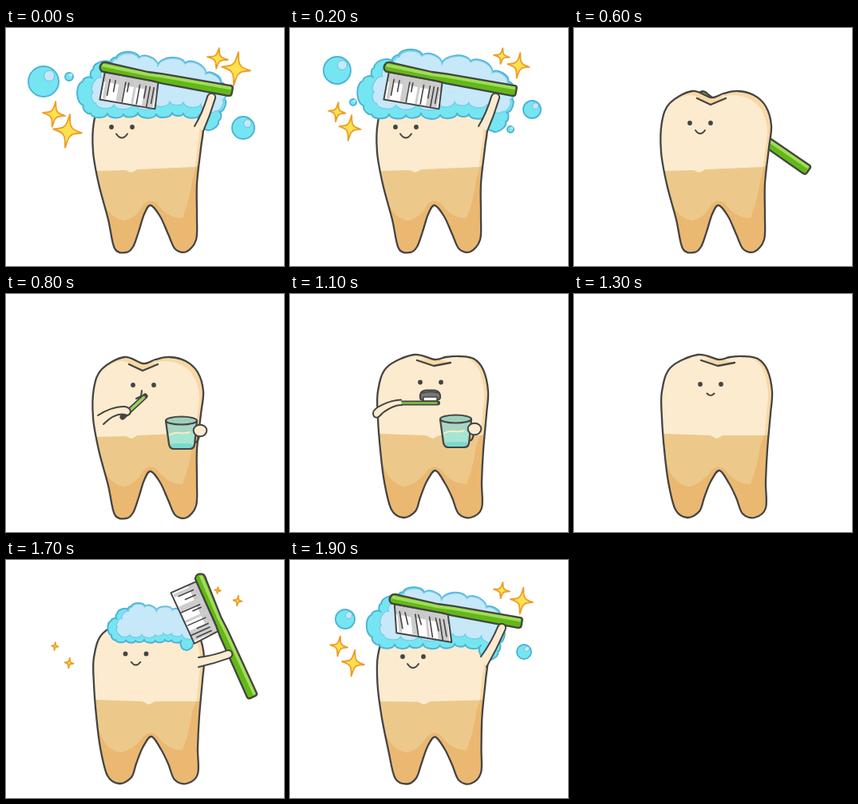
An HTML page with a canvas for the animation above (2 s loop, 348 by 298 pixels).

```html
<!DOCTYPE html>
<html lang="en">
<head>
<meta charset="utf-8">
<title>Brushing tooth</title>
<style>
html, body { margin: 0; width: 100%; height: 100%; overflow: hidden; background: #fff; }
canvas { display: block; }
</style>
</head>
<body>
<canvas id="stage" width="348" height="298"></canvas>
<script>
const c = document.getElementById('stage').getContext('2d');
const INK = '#444443', CREAM = '#fcebcf', PEACH = '#f8d8a5', SAND = '#ecc98b', TAN = '#ebb872';
const AQUA = '#76e5f2', ICE = '#c6e8f9', BLUE = '#4db4d4';
const STEP = 100, STEPS = 20;

const mix = (a, b, k) => a + (b - a) * k;

// Linear keyframes: rows of [step, ...values]
function key(rows, m) {
  if (m <= rows[0][0]) return rows[0].slice(1);
  for (let i = 1; i < rows.length; i++) {
    const a = rows[i - 1], b = rows[i];
    if (m <= b[0]) {
      const k = (m - a[0]) / (b[0] - a[0]);
      return a.slice(1).map((v, j) => mix(v, b[j + 1], k));
    }
  }
  return rows[rows.length - 1].slice(1);
}

function paint(path, fill, stroke, width = 2) {
  if (fill) { c.fillStyle = fill; c.fill(path); }
  if (stroke) { c.strokeStyle = stroke; c.lineWidth = width; c.stroke(path); }
}
const shape = (d, fill, stroke, width) => paint(new Path2D(d), fill, stroke, width);

function disc(x, y, rx, ry = rx) {
  const p = new Path2D();
  p.ellipse(x, y, rx, ry, 0, 0, 7);
  return p;
}

// Smooth closed curve through points
function smooth(pts) {
  const p = new Path2D(), n = pts.length, at = i => pts[(i + n) % n];
  p.moveTo(...pts[0]);
  for (let i = 0; i < n; i++) {
    const [a, b, d, e] = [at(i - 1), at(i), at(i + 1), at(i + 2)];
    p.bezierCurveTo(b[0] + (d[0] - a[0]) / 6, b[1] + (d[1] - a[1]) / 6,
      d[0] - (e[0] - b[0]) / 6, d[1] - (e[1] - b[1]) / 6, d[0], d[1]);
  }
  p.closePath();
  return p;
}

// Clockwise points joined by bulging lobes
function scallop(pts, s) {
  const p = new Path2D();
  const q = pts.map(([x, y]) => [185 + (x - 185) * s, 90 + (y - 90) * s]);
  p.moveTo(...q[0]);
  q.forEach((a, i) => {
    const b = q[(i + 1) % q.length], dx = b[0] - a[0], dy = b[1] - a[1];
    p.bezierCurveTo(a[0] + dx * .1 + dy * .33, a[1] + dy * .1 - dx * .33,
      b[0] - dx * .1 + dy * .33, b[1] - dy * .1 - dx * .33, b[0], b[1]);
  });
  p.closePath();
  return p;
}

const BODY_A = [[172,87],[187,82],[205,79],[225,84],[240,98],[247,122],[244,150],[239,195],[239,235],
  [238,265],[226,280],[212,277],[203,258],[193,236],[181,222],[173,233],[166,255],[159,274],[150,281],
  [136,276],[128,240],[116,195],[109,155],[110,118],[120,94],[148,79]];
const BODY_B = [[181,82],[195,79],[212,78],[230,81],[242,95],[248,122],[246,150],[242,195],[240,235],
  [240,268],[226,280],[211,275],[203,255],[194,237],[182,221],[171,235],[163,255],[157,272],[142,280],
  [127,270],[118,235],[113,195],[110,155],[110,122],[121,92],[155,76]];
const FOAM = [[106,107],[97,97],[96,67],[108,63],[109,52],[131,44],[138,37],[167,37],[190,47],[224,44],
  [250,57],[269,68],[273,88],[267,105],[266,116],[250,127],[243,108],[222,107],[208,106],[188,108],
  [165,106],[147,108],[127,107]];
const FOAM_IN = [[112,94],[109,81],[119,62],[133,47],[139,39],[166,38],[190,48],[224,45],[250,58],
  [268,70],[271,90],[262,104],[244,95],[222,93],[205,92],[188,96],[160,95],[135,96]];

function bodyPath(k) {
  return smooth(BODY_A.map(([x, y], i) => [mix(x, BODY_B[i][0], k), mix(y, BODY_B[i][1], k)]));
}

function drawBody(body, k) {
  const L = (a, b) => mix(a, b, k), nx = L(157, 179), ly = L(179, 175), ry = L(173, 177);
  const groove = `M${L(154,159)},${L(88,83)}L${L(171,180)},${L(96,90)}L${L(190,201)},${L(88,86)}`;
  c.save();
  c.clip(body);
  paint(body, PEACH);
  c.save();
  c.translate(-5, L(5, 1));
  paint(body, CREAM);
  c.restore();
  shape(groove + `L${L(172,181)},${L(84,80)}Z`, PEACH);
  shape(`M90,${ly}L113,${ly}L${nx - 9},${ly - L(1,-2)}Q${nx - 5},178 ${nx - 3},180Q${nx},182 ${nx + 4},179
    Q${nx + 6},177 ${nx + 9},177L260,${ry}V300H90Z`, SAND);
  const s = -4 * k;
  shape(`M90,190L${117 + s},200Q${124 + s},238 ${148 + s},241Q${163 + s},238 171,222Q181,211 191,222
    Q203,238 221,238Q230,215 233,190L238,${ry}H260V300H90Z`, TAN);
  c.restore();
  paint(body, null, INK, 2.3);
  shape(groove, null, INK, 2.3);
}

function drawFoam(body, m) {
  const [s] = key([[-4,.4],[-2,.8],[-1,.93],[0,1],[2,1.05],[4,1]], m);
  const outer = scallop(FOAM, s), inner = scallop(FOAM_IN, s);
  const fading = m > 3;
  c.save();
  if (fading) {
    c.save();
    c.setLineDash([5, 3, 2, 3]);
    if (m < 5) paint(inner, '#fff', BLUE, 1);
    c.restore();
    drawBody(body, 0);
    c.clip(body);
    c.globalAlpha = m < 5 ? .58 : .2;
    paint(outer, '#78cad8');
    paint(inner, '#cfe0dc');
  } else {
    c.globalAlpha = m === 3 ? .85 : 1;
    paint(outer, AQUA, BLUE, 2);
    paint(inner, ICE, '#77cce9', 1.4);
  }
  c.restore();
  if (fading && m < 5) {
    c.save();
    c.globalAlpha = .55;
    paint(body, null, INK, 1.2);
    c.restore();
  }
}

function drawBrush(x, y, deg, skew) {
  c.save();
  c.translate(x, y);
  c.rotate(deg * Math.PI / 180);
  shape(`M7,6H75L${77 + skew},40L${7 + skew},41Z`, '#fff');
  shape(`M7,6H75L${75 + skew * .4},18L${7 + skew * .4},18Z`, '#c9c9c9');
  [[10,4],[27,7],[46,3],[60,14]].forEach(([a, w]) =>
    shape(`M${a},8H${a + w}L${a + w + skew},39H${a + skew}Z`, '#cdcdcd'));
  [[15,34],[22,28],[35,39],[39,25],[53,38],[61,29],[66,39],[71,34]].forEach(([a, b]) =>
    shape(`M${a},14L${a + skew * b / 41},${b}`, null, INK, 1.6));
  shape(`M7,6H75L${77 + skew},40L${7 + skew},41Z`, null, INK, 2);
  const handle = 'M2,-5Q5,-7 10,-6L60,-4L80,-5L165,-6Q168,-6 168,-3V4Q168,7 164,7L80,7L68,6L3,6Q-3,2 2,-5Z';
  shape(handle, '#61b917');
  shape('M3,-4L60,-3L80,-4L166,-5V-1L80,0L60,1L2,0Z', '#a2dc58');
  shape(handle, null, INK, 2.3);
  c.restore();
}

function drawArm([ax, ay, bx, by, hx, hy]) {
  const dx = hx - (ax + bx) / 2, dy = hy - (ay + by) / 2, d = Math.hypot(dx, dy);
  const ux = dx / d, uy = dy / d, w = 5;
  const l = [hx + uy * w, hy - ux * w], r = [hx - uy * w, hy + ux * w];
  shape(`M${ax},${ay}Q${(ax + l[0]) / 2 + 2},${(ay + l[1]) / 2 + 2} ${l}
    C${l[0] + ux * 7},${l[1] + uy * 7} ${r[0] + ux * 7},${r[1] + uy * 7} ${r}
    Q${(bx + r[0]) / 2 + 1},${(by + r[1]) / 2 + 1} ${bx},${by}`, CREAM, INK, 2);
}

function star(x, y, rx, ry) {
  c.save();
  c.translate(x, y);
  c.rotate(.14);
  const a = rx * .2, b = ry * .2;
  shape(`M0,${-ry}Q${a * .6},${-b * 1.5} ${a * 1.3},${-b * 1.3}Q${a * 1.5},${-b * .6} ${rx},0
    Q${a * 1.5},${b * .6} ${a * 1.3},${b * 1.3}Q${a * .6},${b * 1.5} 0,${ry}
    Q${-a * .6},${b * 1.5} ${-a * 1.3},${b * 1.3}Q${-a * 1.5},${b * .6} ${-rx},0
    Q${-a * 1.5},${-b * .6} ${-a * 1.3},${-b * 1.3}Q${-a * .6},${-b * 1.5} 0,${-ry}Z`,
    '#fde14f', '#ee9d25', 1.9);
  c.restore();
}

function drawStars(m) {
  if (m < -3 || m > 4) return;
  const [s] = key([[-3,.3],[-1,.78],[0,1],[2,.76],[4,.45]], m);
  const [dx, dy] = key([[-1,2,0],[0,0,0],[2,-2,-4],[4,-3,-7]], m);
  star(265, 38 + dy * .7, 13 * s, 13 * s);
  star(288 + dx, 51 + dy, 18 * s, 21 * s);
  star(60 + dx * .6, 108 + dy * .7, 14 * s, 16 * s);
  star(77 + dx, 129 + dy, 18 * s, 21 * s);
}

const BUBBLES = [
  [[-1,69,74,13],[0,47,67,20],[2,59,53,18],[4,82,40,9]],
  [[-1,293,115,10],[0,297,125,15],[2,303,102,12],[4,303,72,7]],
  [[0,79,61,6],[1,80,50,4]],
  [[1,76,103,4],[2,79,93,5],[4,116,82,6]],
  [[1,270,135,4],[2,276,127,5],[4,260,101,6]]
];

function drawBubbles(m) {
  c.save();
  if (m === 4) c.setLineDash([3, 4]);
  for (const rows of BUBBLES) {
    if (m < rows[0][0] || m > rows[rows.length - 1][0]) continue;
    const [x, y, r] = key(rows, m);
    if (m === 4) {
      paint(disc(x, y, r), null, BLUE, 1);
      paint(disc(x + r * .3, y - r * .3, r * .35), null, BLUE, .8);
    } else {
      paint(disc(x, y, r - 1), AQUA, BLUE, 1.9);
      paint(disc(x + r * .36, y - r * .36, r * .33), ICE, r > 8 ? BLUE : null, .7);
    }
  }
  c.restore();
}

function drawTube(dx, dy) {
  c.save();
  c.translate(dx, dy);
  shape('M93,107L124,97L130,140L107,137Q105,128 101,122Q94,114 93,107Z', '#eeeeea', INK, 2);
  shape('M97,91L116,85Q118,85 118,87L121,96L100,103L96,94Q95,92 97,91Z', '#e3e4df', INK, 2);
  shape('M103,95L118,91', null, INK, 1.8);
  c.restore();
}

function drawCup(dx, dy) {
  c.save();
  c.translate(dx, dy);
  shape('M238,164Q246,168 241,181Q240,186 235,186', null, INK, 2.2);
  const cup = 'M200,159L204,188Q205,194 210,194H230Q235,194 236,189L239,159Z';
  shape(cup, '#a9d5c3');
  shape('M203,176Q220,172 236,174L235,191L208,192Z', '#a6e5d2');
  shape('M206,188Q220,186 235,188L233,193H208Z', '#7bd9cb');
  shape('M205,176Q212,173 218,174T230,173', null, '#f4edc8', 2);
  shape(cup, null, INK, 2.2);
  paint(disc(219.5, 158.5, 19.5, 5), '#9fcfba', INK, 2.2);
  paint(disc(243, 171, 8.3, 7.3), CREAM, INK, 2);
  c.restore();
}

function drawHandBrush(m) {
  c.save();
  if (m < 9) {
    if (m === 7) c.translate(-4, 5);
    shape('M163,131L169,128L170,121', null, INK, 2);
    shape('M146,154L174,128', null, INK, 7);
    shape('M153,147.500L172.500,129.500', null, '#9bd25c', 3.5);
    shape('M115,152C124,146 138,140 149,141C158,143 157,150 152,152C143,148 132,153 122,163', CREAM, INK, 2);
  } else {
    shape('M163,130Q162,121 170,120.500H181Q189,122 188,130Q187,133 182,133H168Q163,133 163,130Z', '#777', INK, 2.2);
    shape('M166,124Q176,121 185,124', null, INK, 1.6);
    c.translate([-4, 4, 0, -4][m - 9], 0);
    shape('M167,129H184V134H167Z', '#fff', INK, 1.5);
    shape('M128,136.500H185', null, INK, 6);
    shape('M130,136.500H183.500', null, '#86c641', 2.4);
    shape('M139,132.500C125,133 104,142 104,149C104,155 110,156 113,153C118,146 130,139 140,139Z', CREAM);
    shape('M139,132.500C125,133 104,142 104,149C104,155 109,156 112,153C118,146 130,139 140,139', null, INK, 2);
  }
  c.restore();
}

function drawFace(m) {
  const [x, y, w, d, my] = key([[-7,171,113,4.5,3,11.5],[-5,171,114,4.5,3,11.5],[-1,154,121,7,6,9],
    [0,145,124,7,6,8.5],[4,145,124,7,6,8.5],[6,158,119,6,5,9],[8,172,114,5,4,11],
    [11,176,110.5,5,4,11],[12,174,111,5,4,11]], m);
  paint(disc(x - 13, y, 2.9), INK);
  paint(disc(x + 13, y, 2.9), INK);
  if (m < 7) shape(`M${x - w},${y + my}Q${x},${y + my + d * 1.7} ${x + w},${y + my}`, null, INK, 2);
}

const BRUSH = [[-4,190,35,66,0],[-3,241,18,66,0],[-2,165,25,38,4],[-1,125,48,10.5,9],[0,118,48,10.5,0],
  [1,122,48,10.5,4],[2,118,48,10.5,0],[3,178,34,38,0],[4,238,20,66,0],[5,247,28,66,0],[6,156,82,35,0]];
const ARM = [[-3,241,122,241,134,278,118],[-2,240,121,244,134,272,102],[-1,239,121,246,134,265,85],
  [0,236,123,247,129,257,87],[2,236,123,247,129,257,87],[3,239,122,244,132,267,104],
  [4,241,122,241,134,275,120],[5,241,123,241,135,284,127]];

function draw(step) {
  // Steps before the loop point count down to zero
  const m = step > 12 ? step - STEPS : step;
  const k = m === -1 || m === 9 ? .5 : m >= 0 && m < 9 ? 0 : 1;
  const body = bodyPath(k);
  const brush = key(BRUSH, m);
  c.clearRect(0, 0, 348, 298);
  c.fillStyle = '#fff';
  c.fillRect(0, 0, 348, 298);
  c.lineCap = c.lineJoin = 'round';

  if (m >= -6 && m <= -4) drawTube(...key([[-6,12,14],[-5,0,0],[-4,10,12]], m));
  if (m === -4 || m === 6) drawBrush(...brush);
  drawBody(body, k);
  if (m >= -3 && m <= 5) drawFoam(body, m);
  drawFace(m);
  drawBubbles(m);
  drawStars(m);
  if (m >= -3 && m <= 5) {
    drawBrush(...brush);
    drawArm(key(ARM, m));
  }
  if (m >= 7) {
    drawHandBrush(m);
    drawCup(...key([[7,5,4],[8,0,0],[11,-12,-2],[12,-9,0]], m));
  }
}

const start = performance.now();
function tick() {
  draw(Math.floor((performance.now() - start) / STEP) % STEPS);
  requestAnimationFrame(tick);
}
tick();
</script>
</body>
</html>
```
